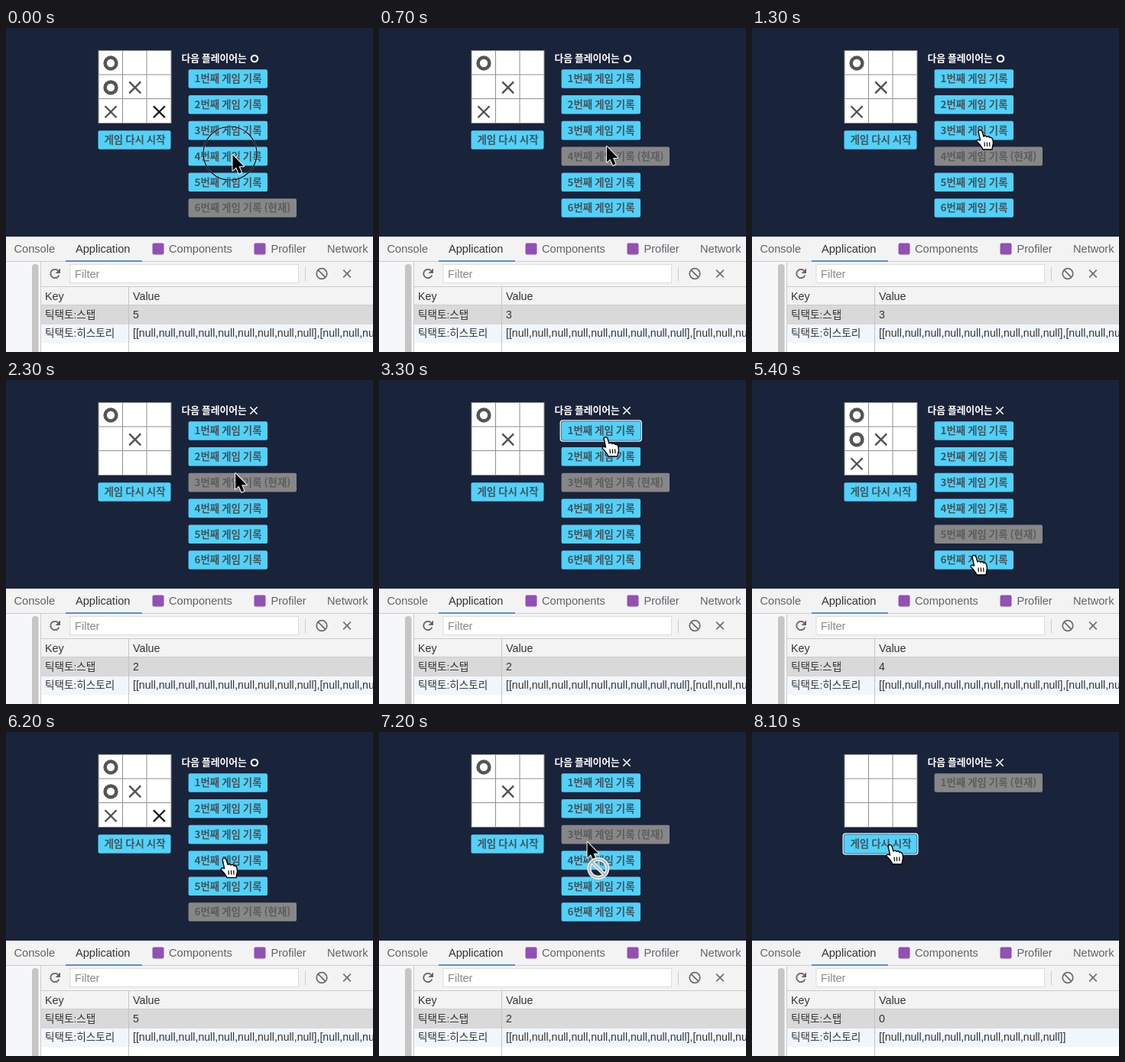
Recreate the animation shown at these times as an HTML page with a canvas. Size 480 by 424 pixels, loop 8200 ms.

```html
<!DOCTYPE html>
<html lang="ko">
<head>
<meta charset="utf-8">
<style>
  html, body { margin: 0; width: 100%; height: 100%; overflow: hidden; background: #19233a; }
  canvas { display: block; }
</style>
</head>
<body>
<canvas id="stage" width="480" height="424"></canvas>
<script>
const ctx = document.getElementById('stage').getContext('2d');
const LOOP = 8200, STEP = 100;
const LATIN = '"Liberation Sans", Arial, sans-serif';
const KOREAN = '"Noto Sans CJK KR", "Noto Sans CJK", sans-serif';
const MIXED = '"Liberation Sans", "Noto Sans CJK KR", sans-serif';
const MOVES = [4, 0, 6, 3, 8];           // X plays first
const RESET = -1;

// Each press shows a ring, then focus, then takes effect 300 ms later.
const PRESSES = [
  [-100, 3], [1600, 2], [3100, 0], [3800, 3],
  [4700, 4], [5500, 5], [6400, 2], [7700, RESET]
].map(([time, target]) => ({ time, target }));

const CURSOR_PATH = [
  [0, 296, 165], [300, 296, 165], [1300, 300, 134], [2000, 300, 134],
  [3000, 298, 75], [3450, 298, 75], [3800, 294, 162], [4300, 294, 162],
  [4700, 293, 197], [5000, 293, 197], [5400, 292, 230], [5850, 292, 230],
  [6400, 285, 138], [6900, 285, 138], [7200, 272, 143], [7700, 182, 148], [LOOP, 182, 148]
];

const ARROW = new Path2D('M0.5 1V21.5L5 17.3L8.6 25.5L12 24L8.6 16H15Z');
const HAND = new Path2D('M-4 1Q-2-2 .8 1L3 8Q5 6 7 8.5Q9.5 6.5 11 9.5Q14 8.5 15 12.5L15.5 17Q14.5 21 14 25H2Q0 20-6 14.5Q-6 11-1.5 13Z');

function rect(x, y, w, h, color) {
  ctx.fillStyle = color;
  ctx.fillRect(x, y, w, h);
}

function roundRect(x, y, w, h, r, color) {
  ctx.beginPath();
  ctx.roundRect(x, y, w, h, r);
  ctx.fillStyle = color;
  ctx.fill();
}

function text(str, x, y, size, color, family = LATIN, weight = 400) {
  ctx.font = `${weight} ${size}px ${family}`;
  ctx.fillStyle = color;
  ctx.fillText(str, x, y);
}

function line(x1, y1, x2, y2, color, width) {
  ctx.strokeStyle = color;
  ctx.lineWidth = width;
  ctx.beginPath();
  ctx.moveTo(x1, y1);
  ctx.lineTo(x2, y2);
  ctx.stroke();
}

function circle(x, y, r, color, width) {
  ctx.strokeStyle = color;
  ctx.lineWidth = width;
  ctx.beginPath();
  ctx.arc(x, y, r, 0, Math.PI * 2);
  ctx.stroke();
}

function cross(x, y, r, color, width) {
  line(x - r, y - r, x + r, y + r, color, width);
  line(x - r, y + r, x + r, y - r, color, width);
}

function cursorAt(t) {
  const i = CURSOR_PATH.findIndex(key => key[0] > t);
  const [t0, x0, y0] = CURSOR_PATH[i - 1], [t1, x1, y1] = CURSOR_PATH[i];
  const p = (t - t0) / (t1 - t0), eased = p * p * (3 - 2 * p);
  return { x: x0 + (x1 - x0) * eased, y: y0 + (y1 - y0) * eased };
}

function stateAt(t) {
  const state = { step: 5, reset: false, focus: null, ring: null };
  for (const { time, target } of PRESSES) {
    const age = t - time;
    if (age < 0) continue;
    if (age < 200) state.ring = 25 + age / 10;
    else if (age < 300 || target === RESET) state.focus = target;
    if (age >= 300) {
      state.step = Math.max(target, 0);
      state.reset = target === RESET;
    }
  }
  return state;
}

function button(label, x, y, w, disabled, focused) {
  if (focused) {
    roundRect(x - 2, y - 2, w + 4, 28.6, 4, '#f4faff');
    roundRect(x - 0.7, y - 0.7, w + 1.4, 26, 3, '#1c4a70');
  }
  roundRect(x, y, w, 24.6, 2, disabled ? '#878787' : '#52d1f9');
  text(label, x + 8, y + 17.1, 13.4, disabled ? '#5d5d5d' : '#46545b', KOREAN, 700);
}

function drawBoard(step) {
  rect(120.5, 29, 96, 96, '#888');
  rect(121.5, 30, 94, 94, '#fff');
  for (const d of [31.5, 63]) {
    line(121 + d, 30, 121 + d, 124, '#909090', 1);
    line(121.5, 29.5 + d, 215.5, 29.5 + d, '#909090', 1);
  }
  MOVES.slice(0, step).forEach((cell, turn) => {
    const x = 137 + cell % 3 * 31.7, y = 46 + Math.floor(cell / 3) * 31.9;
    if (turn % 2) circle(x, y, 7.4, '#555', 4.5);
    else cross(x, y, 7.5, turn === 4 ? '#111' : '#505050', 2.3);
  });
}

function drawGame({ step, reset, focus }) {
  rect(0, 0, 480, 273, '#19233a');
  drawBoard(step);
  button('게임 다시 시작', 120.5, 134.2, 95, false, focus === RESET);
  text('다음 플레이어는', 229.5, 44, 12.8, '#fff', KOREAN, 700);
  if (step % 2) circle(325, 40, 4.2, '#fff', 2.2);
  else cross(324, 40, 4.7, '#fff', 1.6);
  for (let i = 0; i < (reset ? 1 : 6); i++) {
    const current = i === step;
    button(`${i + 1}번째 게임 기록${current ? ' (현재)' : ''}`,
      238.6, 54.2 + i * 33.8, current ? 141.4 : 103.4, current, focus === i);
  }
}

function drawTools({ step, reset }) {
  rect(0, 273, 480, 151, '#f3f3f3');
  rect(0, 306, 45, 118, '#f6f7f9');
  const tabs = [['Console', 10.5], ['Application', 91], ['Components', 213], ['Profiler', 346.5], ['Network', 420]];
  for (const [name, x] of tabs) text(name, x, 294, 14.6, name === 'Application' ? '#333' : '#5f6368');
  for (const x of [191.5, 324.5]) roundRect(x, 281.5, 15, 15, 2, '#9150b4');
  rect(0, 305, 480, 1, '#ccc');
  rect(78, 304, 100, 2, '#5b8fd4');

  roundRect(34, 309, 8.5, 130, 4, '#c6c6c6');
  rect(45, 306, 1, 118, '#ccc');
  ctx.strokeStyle = '#666';
  ctx.lineWidth = 1.8;
  ctx.beginPath();
  ctx.arc(64, 321.5, 5.7, 0.35, 5.5);
  ctx.stroke();
  ctx.fillStyle = '#666';
  ctx.fill(new Path2D('M71 314.5V321H64.5Z'));
  rect(83.5, 309, 299.5, 25, '#ddd');
  rect(84.5, 310, 297.5, 23, '#fff');
  text('Filter', 90, 327, 14.6, '#888');
  rect(391, 313, 1, 18, '#ccc');
  circle(413, 321.5, 6.8, '#6e6e6e', 1.8);
  line(408.3, 316.8, 417.7, 326.2, '#6e6e6e', 1.8);
  cross(446, 321.5, 4.8, '#6e6e6e', 1.7);

  rect(46, 338, 434, 1, '#ccc');
  rect(46, 362, 434, 1, '#ccc');
  rect(46, 363, 434, 25, '#d9d9d9');
  rect(46, 388, 434, 24, '#f1f6fd');
  rect(46, 412, 434, 12, '#fff');
  rect(160, 339, 1, 85, '#c4c4c4');
  text('Key', 51, 356, 14.3, '#333');
  text('Value', 166, 356, 14.3, '#333');
  text('틱택토:스탭', 51, 380, 13.6, '#333', MIXED);
  text(step, 166, 380, 14.1, '#333');
  text('틱택토:히스토리', 51, 403.5, 13.6, '#333', MIXED);
  const empty = `[${Array(9).fill('null').join()}]`;
  text(reset ? `[${empty}]` : `[${empty},${empty}`, 166, 403.5, 14.1, '#333');
}

function drawCursor({ x, y }, { step, reset, ring }) {
  const row = Math.floor((y - 54) / 33.8);
  const onRow = x >= 238 && row >= 0 && row < (reset ? 1 : 6) &&
    y - 54 - row * 33.8 <= 25 && x <= (row === step ? 380 : 342);
  const onReset = x >= 120 && x <= 216 && y >= 134 && y <= 159;
  const blocked = onRow && row === step;

  if (ring) {
    circle(x - 3, y - 1, ring, 'rgba(255,255,255,.35)', 2.4);
    circle(x - 3, y - 1, ring, '#050a12', 1.2);
  }
  ctx.save();
  ctx.translate(x, y);
  ctx.lineJoin = 'round';
  if (!ring && !blocked && (onRow || onReset)) {
    ctx.fillStyle = '#fff';
    ctx.fill(HAND);
    ctx.strokeStyle = '#000';
    ctx.lineWidth = 1.4;
    ctx.stroke(HAND);
    for (const dx of [4, 7.3, 10.6]) line(dx, 15.5, dx + 0.4, 21, '#000', 1.2);
  } else {
    ctx.strokeStyle = '#fff';
    ctx.lineWidth = 2;
    ctx.stroke(ARROW);
    ctx.fillStyle = '#000';
    ctx.fill(ARROW);
    if (blocked) {
      for (const [color, width] of [['#f2f5f7', 5], ['#b4bac0', 2.2]]) {
        circle(14.8, 35.5, 12, color, width);
        line(6.3, 27, 23.3, 44, color, width);
      }
    }
  }
  ctx.restore();
}

function frame(now) {
  const t = Math.floor((now - start) % LOOP / STEP) * STEP;
  const state = stateAt(t);
  drawGame(state);
  drawTools(state);
  drawCursor(cursorAt(t), state);
  requestAnimationFrame(frame);
}

let start;
requestAnimationFrame(now => {
  start = now;
  frame(now);
});
</script>
</body>
</html>
```
